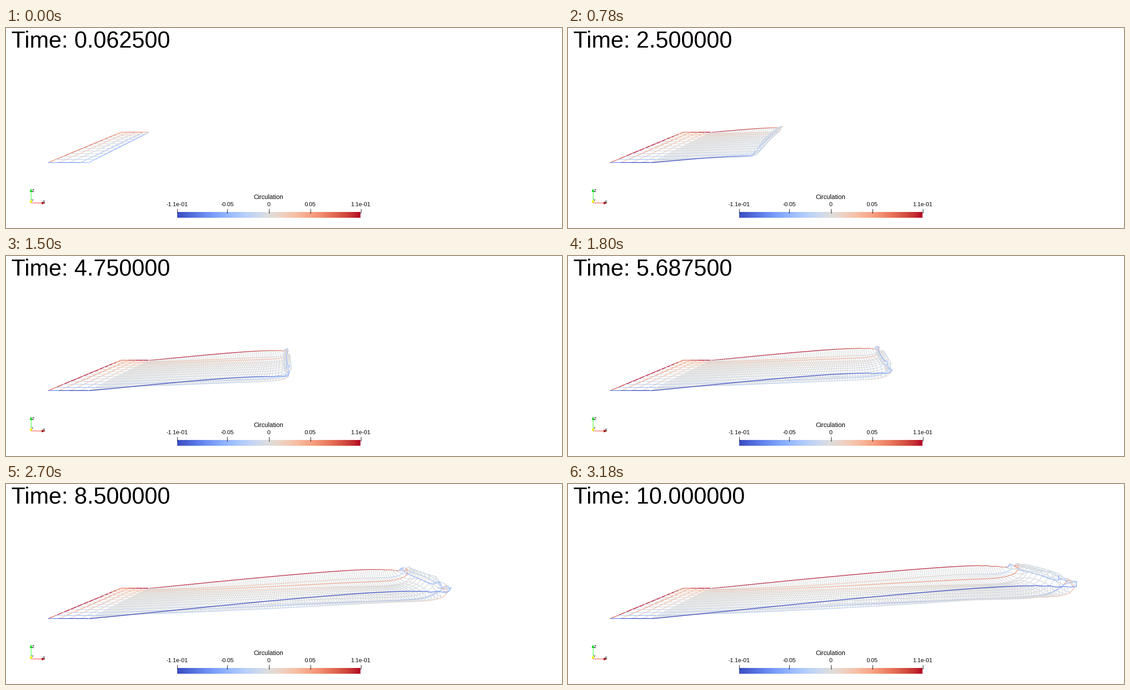
Write a matplotlib script that moves like this. It is 1247x449 px and loops after 3.24 s.

```python
import numpy as np
import matplotlib.pyplot as plt
from matplotlib.animation import FuncAnimation
from matplotlib.collections import LineCollection
from matplotlib.patches import Polygon

W, H, DPI = 1247, 449, 100
FRAMES, INTERVAL = 54, 60
PX = 72 / DPI

# Flat rectangular wing in a free stream tilted by five degrees
SPAN, N_SPAN, N_CHORD = 4.0, 13, 4
DT, STEPS_PER_FRAME = 0.0625, 3
ALPHA = np.radians(5)
STREAM = np.array([np.cos(ALPHA), 0, np.sin(ALPHA)])
CORE_WING, CORE_WAKE = 0.005, 0.03
DECAY = 0.0045  # loss of the rings next to the tips as the wake ages

# Pitched perspective camera
FOCAL, DIST, RISE, MID_X = 862.0, 8.887, -0.799, 5.526
PITCH = np.arctan(0.1667)


def strengths(g):
    """Net circulation of the spanwise and chordwise edges of the rings."""
    span = np.diff(np.pad(g, ((0, 0), (1, 1))), axis=1)
    chord = -np.diff(np.pad(g, ((1, 1), (0, 0))), axis=0)
    return span, chord


def edge_terms(a, b, gamma):
    moment = np.concatenate([a - b, np.cross(a, b)], axis=-1)
    moment = moment * (gamma / (2 * np.pi))[..., None]
    return moment.reshape(-1, 6), ((a - b) ** 2).sum(-1)


def edge_sum(ra, rb, length2, moment):
    total = ra + rb
    kernel = total * total
    kernel -= length2
    kernel *= ra
    kernel *= rb
    total /= kernel
    return total.reshape(len(total), -1) @ moment


def induced(points, grid, g, core, chunk=16):
    """Biot-Savart velocity of the whole ring lattice at the points."""
    span, chord = strengths(g)
    span_m, span_l = edge_terms(grid[:-1], grid[1:], span)
    chord_m, chord_l = edge_terms(grid[:, :-1], grid[:, 1:], chord)
    nodes = grid.reshape(-1, 3)
    node2 = (nodes ** 2).sum(1) + core ** 2
    out = np.empty((len(points), 6))
    for k in range(0, len(points), chunk):
        p = points[k:k + chunk]
        r = p @ (-2 * nodes.T)
        r += node2
        r += (p ** 2).sum(1)[:, None]
        r = np.sqrt(np.maximum(r, core ** 2)).reshape(len(p), *grid.shape[:2])
        out[k:k + chunk] = (edge_sum(r[:, :-1], r[:, 1:], span_l, span_m)
                            + edge_sum(r[:, :, :-1], r[:, :, 1:], chord_l, chord_m))
    return np.cross(points, out[:, :3]) + out[:, 3:]


def make_wing():
    x = np.append(0.0625 + 0.25 * np.arange(N_CHORD), 1.0)
    y = np.linspace(0, SPAN, N_SPAN + 1)
    yy, xx = np.meshgrid(y, x, indexing="ij")
    return np.stack([xx, yy, 0 * xx], axis=-1)


def convect(grid, g):
    """Move one half of the wake and mirror it to the other half."""
    half = grid[:(N_SPAN + 1) // 2, N_CHORD:]
    speed = induced(half.reshape(-1, 3), grid, g, CORE_WAKE).reshape(half.shape)
    near = half + (speed + STREAM) * DT
    far = near[::-1] * [1, -1, 1] + [0, SPAN, 0]
    return np.concatenate([near, far])


def simulate():
    wing = make_wing()
    y_mid = (wing[:-1, :-1, 1] + wing[1:, :-1, 1]) / 2
    x_mid = np.broadcast_to(0.1875 + 0.25 * np.arange(N_CHORD), y_mid.shape)
    control = np.stack([x_mid, y_mid, 0 * y_mid], axis=-1).reshape(-1, 3)
    units = np.eye(N_SPAN * N_CHORD).reshape(-1, N_SPAN, N_CHORD)
    matrix = np.stack([induced(control, wing, u, CORE_WING)[:, 2] for u in units], axis=1)

    grid, wake = wing, np.zeros((N_SPAN, 0))
    states = []
    for step in range(STEPS_PER_FRAME * (FRAMES - 1) + 1):
        g = np.concatenate([np.zeros((N_SPAN, N_CHORD)), wake], axis=1)
        wash = induced(control, grid, g, CORE_WING)[:, 2] + STREAM[2]
        g[:, :N_CHORD] = np.linalg.solve(matrix, -wash).reshape(N_SPAN, N_CHORD)
        if step % STEPS_PER_FRAME == 0:
            states.append((grid, g))
        grid = np.concatenate([wing, convect(grid, g)], axis=1)
        wake = g[:, N_CHORD - 1:].copy()
        wake[[1, -2]] -= DECAY * DT
    return states


def project(p):
    x, y, z = np.moveaxis(p, -1, 0)
    depth = DIST + y * np.cos(PITCH) - z * np.sin(PITCH)
    up = RISE + y * np.sin(PITCH) + z * np.cos(PITCH)
    return np.stack([W / 2 + 0.5 + FOCAL * (x - MID_X) / depth,
                     H / 2 + 0.5 - FOCAL * up / depth], axis=-1)


def lattice(grid, g):
    """Screen segments and their strengths, ordered from far to near."""
    q = project(grid)
    span, chord = strengths(g)
    ribs = np.stack([q[:-1], q[1:]], axis=2)
    lines = np.stack([q[:, :-1], q[:, 1:]], axis=2)
    lines[:, N_CHORD:N_CHORD + 1, 0, 0] += 1.2  # slit behind the trailing edge
    segs, values = [], []
    for j in range(N_SPAN, -1, -1):
        segs.append(lines[j])
        values.append(chord[j])
        if j:
            segs.append(ribs[j - 1])
            values.append(span[j - 1])
    return np.concatenate(segs), np.concatenate(values)


states = simulate()
# The colour range ends just below the strength of the tip vortex
limit = 0.92 * abs(strengths(states[-1][1])[1][0, N_CHORD])

fig = plt.figure(figsize=(W / DPI, H / DPI), dpi=DPI, facecolor="white")
ax = fig.add_axes([0, 0, 1, 1])


def label(x, y, text, size, ha="center"):
    return ax.text(x, y, text, fontsize=size * PX, ha=ha, va="baseline",
                   family="Liberation Sans", color="black", zorder=6)


def stroke(x, y, color, width=1.0):
    ax.plot(x, y, color=color, lw=width * PX, solid_capstyle="butt", zorder=4)


def cone(points, color):
    ax.add_patch(Polygon(points, closed=True, fc=color, ec="none", zorder=5))


def draw_color_bar():
    ax.imshow(np.linspace(0, 1, 256)[None], cmap="coolwarm", aspect="auto",
              extent=(384, 795, 426, 413.5), interpolation="nearest")
    ticks = [(384, "-1.1e-01"), (496, "-0.05"), (589.5, "0"),
             (682.5, "0.05"), (795.5, "1.1e-01")]
    for x, text in ticks:
        stroke([x, x], [406, 416], "black")
        label(x, 400.5, text, 13)
    label(588.5, 384.5, "Circulation", 14)


def draw_triad():
    stroke([56, 81], [392.5, 393], "#ff5a50", 1.3)
    stroke([56, 56], [392, 367], "#40ff40", 1.3)
    cone([(80, 390), (88, 393), (80, 396)], "#a80c0c")
    cone([(53, 368), (56, 360.5), (59.2, 368)], "#0cd41c")
    cone([(53.4, 392), (53.8, 388), (56, 386), (58.2, 388), (58.2, 392)], "#f0f000")
    label(60.3, 368, "Z", 9.5)
    label(59.6, 389, "Y", 7)
    label(85, 393, "X", 9)


draw_color_bar()
draw_triad()
title = label(11.5, 44, "", 51.5, ha="left")
mesh = LineCollection([], cmap="coolwarm", linewidths=1.6 * PX, capstyle="butt", zorder=3)
mesh.set_clim(-limit, limit)
ax.add_collection(mesh, autolim=False)
ax.set_xlim(0, W)
ax.set_ylim(H, 0)
ax.axis("off")


def draw(i):
    segs, values = lattice(*states[i])
    mesh.set_segments(segs)
    mesh.set_array(values)
    title.set_text(f"Time: {DT * (1 + STEPS_PER_FRAME * i):.6f}")
    return mesh, title


anim = FuncAnimation(fig, draw, frames=FRAMES, interval=INTERVAL, repeat=True)
plt.show()
```
